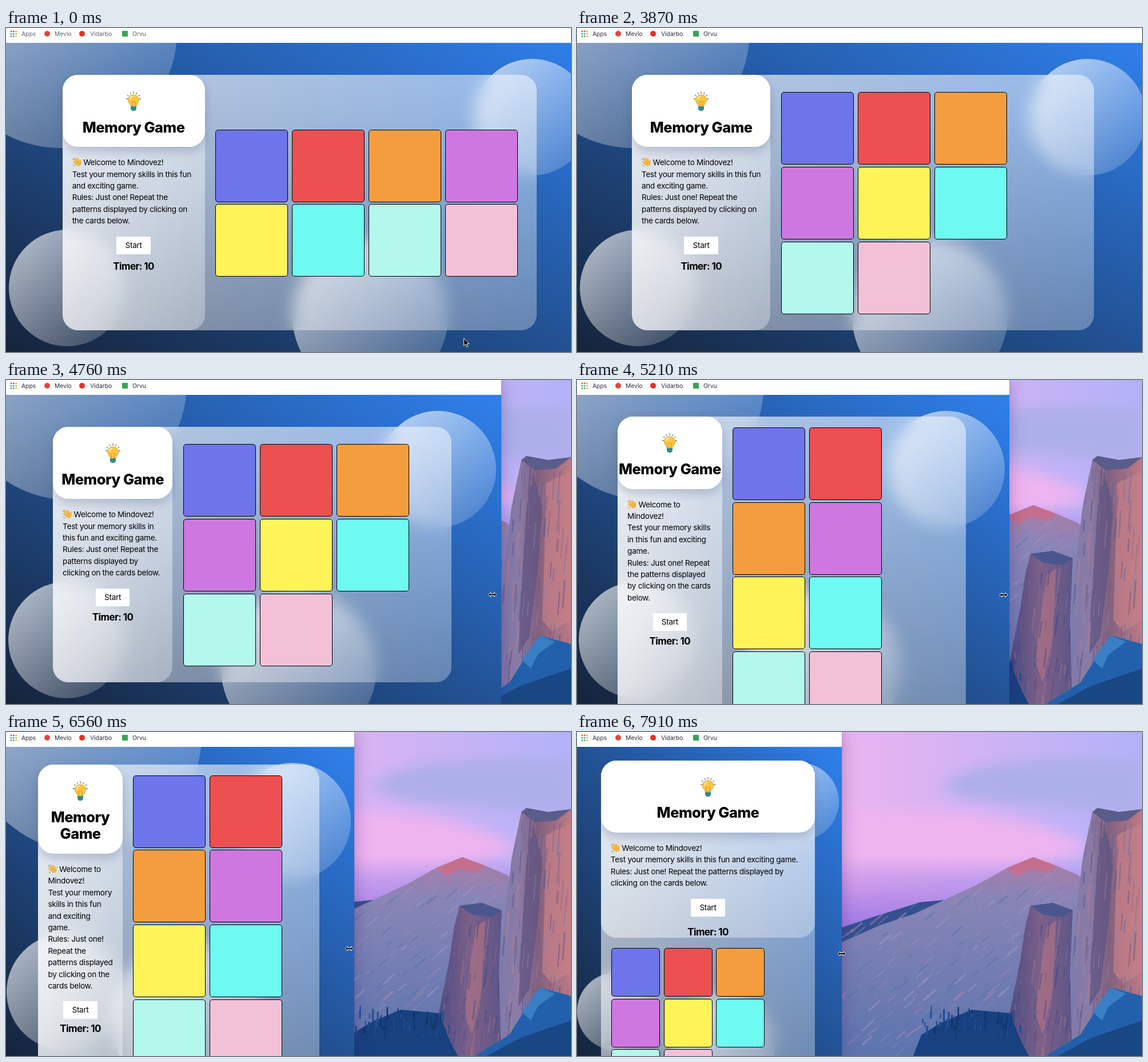
An HTML page for the animation above (8 s loop, 988 px wide and 567 px high).

```html
<!DOCTYPE html>
<html lang="en">
<head>
<meta charset="utf-8">
<title>Memory Game</title>
<style>
  html, body { margin: 0; width: 100%; height: 100%; overflow: hidden; }
  body { position: relative; font: 13.6px/20.4px Inter, sans-serif; letter-spacing: -.3px; color: #000; }
  #wall, .cursor { position: absolute; left: 0; top: 0; }
  #win { position: absolute; left: -5px; top: 0; height: 567px; overflow: hidden;
    box-shadow: 0 0 1px rgba(30, 30, 80, .6), 0 0 26px rgba(60, 30, 110, .35); }
  #page { position: absolute; left: 0; right: 0; top: 26px; height: 559px;
    background: linear-gradient(to right top, #152238, #2f80ed); }
  .ball { position: absolute; border-radius: 50%;
    background: linear-gradient(to right bottom, rgba(255,255,255,.7), rgba(255,255,255,.1)); }
  #bar { position: absolute; left: 5px; top: 0; height: 26px; width: 1100px; background: #fff;
    font-size: 10.3px; line-height: 20px; letter-spacing: 0; }
  #bar span, #bar i { position: absolute; top: 0; }
  #bar i { top: 5px; width: 10px; height: 10px; }
  #bar svg { position: absolute; left: 7px; top: 4px; }
  #panel { position: absolute; border-radius: 27px; backdrop-filter: blur(14px);
    background: linear-gradient(to right bottom, rgba(255,255,255,.7), rgba(255,255,255,.3)); }
  #side { position: absolute; left: 0; top: 0; border-radius: 27px;
    background: linear-gradient(to right bottom, rgba(255,255,255,.7), rgba(255,255,255,.3)); }
  header { background: #fff; border-radius: 27px; padding: 28px 0 20px; text-align: center;
    box-shadow: 0 8px 17px rgba(60, 75, 120, .28); }
  header svg { display: block; margin: 0 auto 11.5px; }
  h1 { margin: 0; font-size: 25.5px; line-height: 29.75px; font-weight: 800; letter-spacing: -.02em; }
  p { margin: 17px; }
  p svg { vertical-align: -3px; margin-right: -1px; }
  .start { width: 59.5px; height: 31px; line-height: 31px; margin: 0 auto; background: #fff; text-align: center; }
  .timer { margin-top: 5%; height: 18.4px; line-height: 19px; font-size: 17px; font-weight: 700;
    letter-spacing: -.6px; text-align: center; }
  .card { position: absolute; box-sizing: border-box; border: 1px solid #000; border-radius: 5px; }
</style>
</head>
<body>
<svg id="wall" width="988" height="567" viewBox="0 0 988 567">
  <defs>
    <linearGradient id="sky" x2="1"><stop stop-color="#ecb4ef"/><stop offset="1" stop-color="#b2b2f8"/></linearGradient>
    <linearGradient id="haze" x2="0" y2="1"><stop stop-color="#a06fe0" stop-opacity="0"/><stop offset="1" stop-color="#9d78e4"/></linearGradient>
    <linearGradient id="slope" x2="0" y2="1"><stop stop-color="#ad7ba6"/><stop offset=".2" stop-color="#8985b6"/><stop offset="1" stop-color="#5c74ad"/></linearGradient>
    <linearGradient id="dome" x2="1"><stop stop-color="#7d7aab"/><stop offset=".3" stop-color="#8a7ba6"/><stop offset=".55" stop-color="#81607f"/><stop offset="1" stop-color="#bd7a85"/></linearGradient>
    <linearGradient id="cliff" x2="1"><stop stop-color="#4e4d84"/><stop offset=".5" stop-color="#7d6088"/><stop offset="1" stop-color="#5d5688"/></linearGradient>
    <filter id="soft"><feGaussianBlur stdDeviation="12"/></filter>
    <clipPath id="slopeClip"><use href="#slopeShape"/></clipPath>
    <clipPath id="domeClip"><use href="#domeShape"/></clipPath>
    <clipPath id="cliffClip"><use href="#cliffShape"/></clipPath>
  </defs>
  <rect x="440" width="548" height="567" fill="url(#sky)"/>
  <path d="M988 55C850 40 690 45 635 95C690 135 850 120 988 150Z" fill="#adafea" filter="url(#soft)"/>
  <path d="M470 140C620 130 800 140 900 205C760 255 600 250 470 225Z" fill="#eeb4f0" filter="url(#soft)"/>
  <rect x="440" y="215" width="548" height="130" fill="url(#haze)"/>
  <path id="slopeShape" d="M440 350L520 323L600 298L642 294L700 267L752 238L798 219L838 234L876 250L930 300V567H440Z" fill="url(#slope)"/>
  <path d="M752 238L798 219L838 234L822 246L795 239L770 252Z" fill="#c46f8d"/>
  <path d="M440 350L520 323L600 298L642 294L590 318L530 338L440 378Z" fill="#354f90"/>
  <g id="slopeLines" clip-path="url(#slopeClip)"></g>
  <path id="domeShape" d="M858 567L866 400L876 290L884 222L901 140L910 133L948 140L988 135V567Z" fill="url(#dome)"/>
  <path d="M918 150L938 220L930 330L915 450L896 480L905 300Z" fill="#5f5380" opacity=".7"/>
  <path d="M945 180L988 160V420L955 440L938 420Z" fill="#c88088" opacity=".7"/>
  <g id="domeLines" clip-path="url(#domeClip)"></g>
  <path d="M901 140L910 133L948 140L988 135L962 155L925 158Z" fill="#5a5c8a"/>
  <path id="cliffShape" d="M757 567L757 490L775 400L784 340L793 304L832 299L867 312L862 420L866 567Z" fill="url(#cliff)"/>
  <path d="M822 340L838 330L832 450L815 530L800 490Z" fill="#b67585" opacity=".6"/>
  <g id="cliffLines" clip-path="url(#cliffClip)"></g>
  <path d="M793 304L832 299L867 312L850 324L815 320Z" fill="#4a578f"/>
  <path d="M588 567L602 530L640 507L690 486L757 492L776 540L790 567Z" fill="#17417f"/>
  <g id="trees"></g>
  <path d="M820 567L880 530L902 495L934 447L988 462V567Z" fill="#2260ab"/>
  <path d="M902 490L934 447L960 458L930 480L918 505Z" fill="#397fc6"/>
  <path d="M840 567L900 535L988 505V567Z" fill="#194783"/>
</svg>

<div id="win">
  <div id="page"></div>
  <div id="panel">
    <div id="side">
      <header>
        <svg width="28" height="37" viewBox="0 0 28 37">
          <g stroke="#5e7f91" stroke-width="1.3">
            <path d="M14 1v4M8 3l1.5 3M20 3l-1.5 3M3 7l2.5 2M25 7l-2.5 2M1 14h3M27 14h-3"/>
          </g>
          <path d="M14 7C8 7 4.500 11.500 4.500 16C4.500 21 9 23 9.200 27H18.800C19 23 23.500 21 23.500 16C23.500 11.500 20 7 14 7Z" fill="#fbc643" stroke="#d99a2e"/>
          <path d="M8 15q1-5 5-5.500" stroke="#fff0b0" stroke-width="2" fill="none"/>
          <path d="M12 27l-1.500-8h7L16 27" fill="none" stroke="#e18e25"/>
          <path d="M9 27h10v5q-2 3.500-5 3.500t-5-3.500Z" fill="#3e9c9c"/>
          <path d="M9 29.500h10M10 32.500h8" stroke="#246670"/>
        </svg>
        <h1>Memory Game</h1>
      </header>
      <p><svg width="17" height="17" viewBox="0 0 17 17">
          <path d="M3 4L7 9M6 2.500L10 8M10 3L12 8M2 8L6 12" stroke="#f3b43f" stroke-width="2.500" stroke-linecap="round"/>
          <path d="M4 9L11 6L13 8L14 4.500Q16 4 15.600 8Q16 13 13 15Q9 17 6 13Z" fill="#f3b43f"/>
          <path d="M1 5Q1 2 4 1M1 13Q2 16 5 16" fill="none" stroke="#7e94a6"/>
        </svg> Welcome to Mindovez!<br>Test your memory skills in this fun and exciting game.<br>Rules: Just one! Repeat the patterns displayed by clicking on the cards below.</p>
      <div class="start">Start</div>
      <div class="timer">Timer: 10</div>
    </div>
  </div>
  <div id="bar">
    <svg id="dots" width="13" height="13"></svg>
    <span style="left:27px">Apps</span>
    <i style="left:67px;background:#e0483c;border-radius:50%"></i><span style="left:85px">Mevlo</span>
    <i style="left:128px;background:#ee2c24;border-radius:50%"></i><span style="left:147px">Vidarbo</span>
    <i style="left:203px;background:#35a457"></i><span style="left:221px">Orvu</span>
  </div>
</div>

<svg class="cursor" id="arrow" width="12" height="18" viewBox="0 0 12 18">
  <path d="M.7 1V14L3.800 11.200L5.800 16L8 15L6 10.500H10Z" fill="#000" stroke="#fff"/>
</svg>
<svg class="cursor" id="resize" width="18" height="12" viewBox="-9 -6 18 12">
  <path d="M-7 0L-3-4V-1.500H3V-4L7 0L3 4V1.500H-3V4Z" fill="#000" stroke="#fff"/>
</svg>

<script>
const $ = id => document.getElementById(id);
const LOOP = 8000, PAD = 18.6;
const COLORS = ['#6e75eb', '#ec5051', '#f49d3e', '#ce77e0', '#fef359', '#6ffaf1', '#b4f7ec', '#f3c1d6'];

// time, window edge, resize cursor x, y
const DRAG = [
  [3720, 1032, 1040, 372], [4320, 924, 907, 375], [4910, 809, 796, 376], [5210, 756, 746, 376],
  [5960, 691, 684, 379], [6110, 661, 657, 380], [7010, 557, 544, 378], [7910, 463, 463, 388]
];
// time, arrow x, y (no position: hidden)
const ARROW = [[0, 800, 542], [150, 799, 556], [300], [1040, 865, 514], [1190, 940, 485], [2080]];

function add(parent, className) {
  const el = document.createElement('div');
  el.className = className;
  return parent.appendChild(el);
}

function place(el, left, top, width, height) {
  Object.assign(el.style, { left: left + 'px', top: top + 'px', width: width + 'px', height: height + 'px' });
}

function addShape(parent, name, attrs) {
  const el = document.createElementNS('http://www.w3.org/2000/svg', name);
  for (const key in attrs) el.setAttribute(key, attrs[key]);
  parent.append(el);
}

const balls = [0, 1, 2, 3].map(() => add($('page'), 'ball'));
const cards = COLORS.map(color => {
  const el = add($('panel'), 'card');
  el.style.background = color;
  return el;
});

const DOTS = ['#ea4335', '#ea4335', '#f29d2c', '#34a853', '#4285f4', '#f29d2c', '#34a853', '#34a853', '#f6b92c'];
DOTS.forEach((fill, i) => addShape($('dots'), 'circle',
  { cx: 2 + i % 3 * 4.3, cy: 2 + Math.floor(i / 3) * 4.3, r: 1.4, fill }));

let seed = 7;
const random = () => (seed = seed * 16807 % 2147483647) / 2147483647;

// Slanted strokes scattered over a box give the rock and the trees their grain.
function scatter(id, count, [x, y, w, h], [dx, dy], colors, opacity) {
  for (let i = 0; i < count; i++) {
    const len = .4 + random();
    addShape($(id), 'path', {
      d: `M${x + random() * w} ${y + random() * h}l${dx * len} ${dy * len}`,
      'stroke-width': 1 + random() * 2.5, stroke: colors[i % colors.length], opacity
    });
  }
}
scatter('slopeLines', 320, [450, 235, 420, 320], [-16, 14], ['#a597c6', '#5573ac', '#a685ae', '#7288bb'], .5);
scatter('domeLines', 110, [862, 150, 126, 340], [-3, 40], ['#6b6596', '#b98090', '#59527f', '#9086b0'], .4);
scatter('cliffLines', 80, [758, 300, 108, 260], [-4, 32], ['#464a82', '#a57288', '#6c6393'], .45);
scatter('trees', 60, [604, 500, 172, 36], [0, -16], ['#17417f', '#123468', '#1f5093'], 1);

let lastWidth;
function layout(width) {
  if (width === lastWidth) return;
  lastWidth = width;
  const narrow = width < 544;
  const panelW = .8 * width, sideW = narrow ? panelW : .3 * panelW;
  const size = narrow ? 85 : 127;
  const stepX = narrow ? 91.5 : 134, stepY = narrow ? 88.4 : 130.7;
  const gridW = (narrow ? panelW : panelW - sideW) - 2 * PAD;
  const cols = Math.floor(gridW / stepX), rows = Math.ceil(8 / cols);
  const tall = narrow || rows > 3;
  const panelH = tall ? 700 : 447;

  $('win').style.width = width + 'px';
  place($('panel'), .1 * width, tall ? 26.3 + .05 * width : 82, panelW, panelH);
  $('side').style.width = sideW + 'px';
  $('side').style.height = narrow ? 'auto' : '100%';
  document.querySelector('h1').style.whiteSpace = sideW > 178 ? 'nowrap' : 'normal';

  const gridX = narrow ? PAD : sideW + PAD;
  const gridY = narrow ? $('side').offsetHeight + PAD
    : tall ? PAD : (panelH - rows * stepY) / 2 + 2.7;
  cards.forEach((card, i) =>
    place(card, gridX + i % cols * stepX, gridY + Math.floor(i / cols) * stepY, size, size));

  const d = narrow ? 136 : 204, low = narrow ? 182 : 272;
  place(balls[0], -.1 * width, -224, 408, 408);
  balls[0].style.display = narrow ? 'none' : '';
  place(balls[1], .99 * width - d, 28, d, d);
  place(balls[2], .01 * width, 531 - d, d, d);
  place(balls[3], .75 * width - low, 615 - low, low, low);
}

function dragAt(t) {
  const next = DRAG.findIndex(key => key[0] >= t);
  if (next === 0) return DRAG[0];
  if (next < 0) return DRAG[DRAG.length - 1];
  const a = DRAG[next - 1], b = DRAG[next], k = (t - a[0]) / (b[0] - a[0]);
  return a.map((v, i) => v + (b[i] - v) * k);
}

// The drag advances in steps of 150 ms.
function stepTime(t) {
  if (t < 3870) return 0;
  const start = t < 4910 ? 3870 : 4910;
  return start + Math.floor((t - start) / 150) * 150;
}

function show(el, x, y) {
  el.style.display = x === undefined ? 'none' : '';
  el.style.transform = `translate(${x}px, ${y}px)`;
}

function draw(t) {
  const [, edge, x, y] = dragAt(stepTime(t));
  layout(Math.round(edge) + 5);
  if (t < 3870) show($('resize'));
  else show($('resize'), x - 9, y - 6);
  const [, ax, ay] = ARROW.filter(key => key[0] <= t).pop();
  show($('arrow'), ax, ay);
  $('bar').style.color = t < 2230 ? '#5c6072' : '#25283a';
}

const begin = performance.now();
function frame() {
  draw((performance.now() - begin) % LOOP);
  requestAnimationFrame(frame);
}
frame();
</script>
</body>
</html>
```
